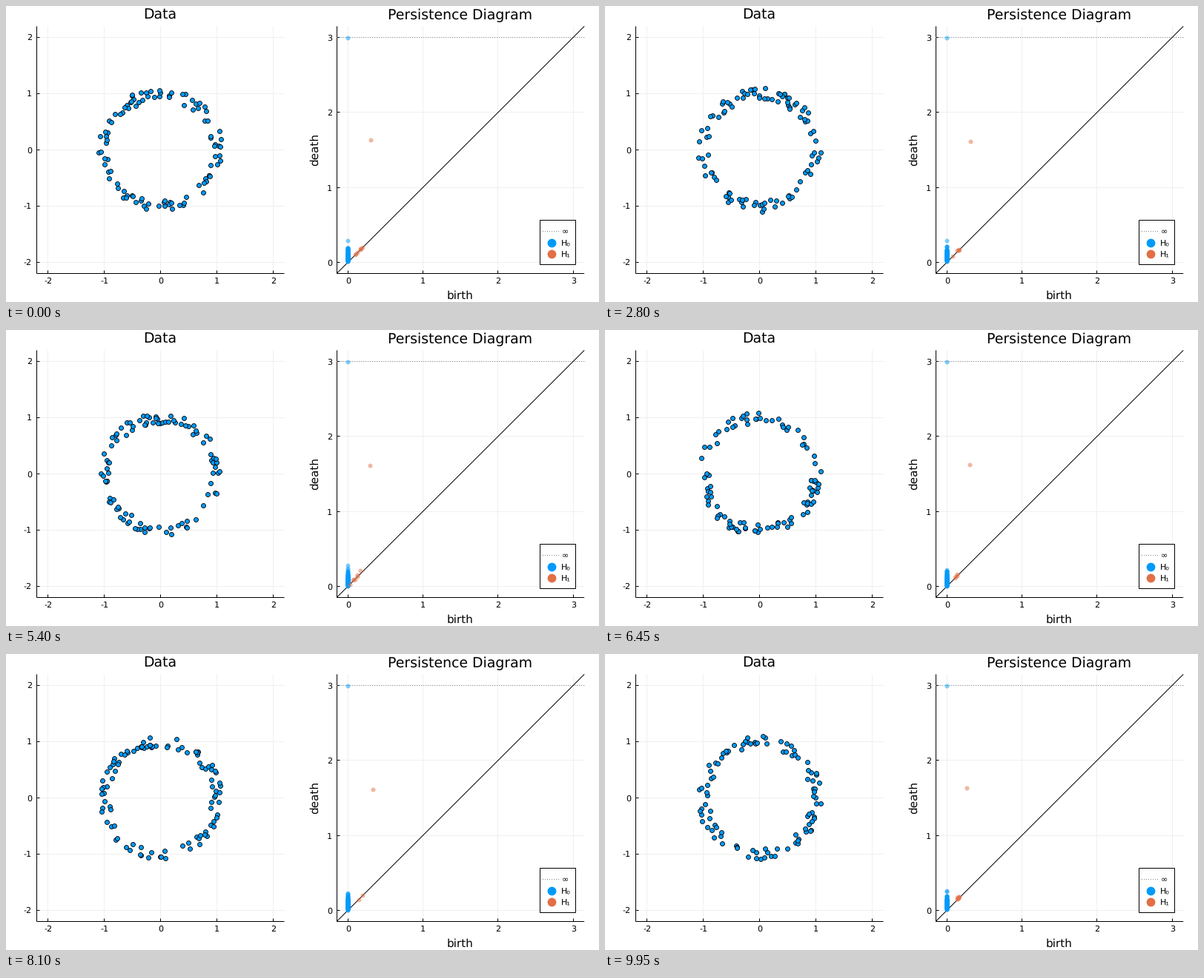
Write a matplotlib script that moves like this. It is 800 by 400 pixels and loops after 10000 ms.

```python
import math

import numpy as np
import matplotlib.pyplot as plt
from matplotlib.animation import FuncAnimation
from matplotlib.patches import Rectangle

W, H, DPI = 800, 400, 100
FRAMES, INTERVAL = 200, 50
N_POINTS, R_IN, R_OUT = 100, 0.9, 1.1
LOCAL_REACH = 0.3  # longest edge searched for short-lived loops
BLUE, ORANGE = "#009AFA", "#E26F46"

plt.rcParams.update({
    "font.family": "DejaVu Sans",
    "text.hinting": "none",
    "toolbar": "None",
})


def px(n):
    """Pixels to points."""
    return n * 72 / DPI


def crisp(v):
    """Centre of the pixel that holds v."""
    return math.floor(v) + 0.5


# ---------- data and persistent homology ----------

def annulus(rng):
    angle = rng.uniform(-np.pi, np.pi, N_POINTS)
    radius = np.sqrt(rng.uniform(R_IN**2, R_OUT**2, N_POINTS))
    return radius * np.cos(angle), radius * np.sin(angle)


def merge_edges(edges, angle):
    """Component merge edges and the first edge closing a loop round the centre."""
    comp = np.arange(len(angle))
    lift = angle.copy()
    merges, closing = [], None
    for k, (i, j) in enumerate(edges):
        step = (angle[j] - angle[i] + np.pi) % (2 * np.pi) - np.pi
        slip = lift[i] + step - lift[j]
        if comp[i] != comp[j]:
            members = comp == comp[j]
            lift[members] += slip
            comp[members] = comp[i]
            merges.append(k)
        elif closing is None and abs(slip) > np.pi:
            closing = k
        if closing is not None and len(merges) == len(angle) - 1:
            break
    return merges, closing


def fill_length(x, y, dist):
    """Shortest scale at which one triangle covers the centre."""
    ccw = np.outer(x, y) - np.outer(y, x) > 0
    reach = np.where(ccw, dist, np.inf)
    two_steps = np.maximum(reach[:, :, None], reach[None]).min(axis=1)
    return np.maximum(two_steps, reach.T).min()


def small_loops(edges, length, n):
    """Pairs (birth, death) from reducing the triangle boundary matrix."""
    rank = np.full((n, n), len(length))
    columns, pairs = {}, []
    count = np.searchsorted(length, LOCAL_REACH)
    for k, (i, j) in enumerate(edges[:count]):
        common = np.flatnonzero((rank[i] < k) & (rank[j] < k))
        for c in common:
            col = 1 << k | 1 << int(rank[i, c]) | 1 << int(rank[j, c])
            while col:
                pivot = col.bit_length() - 1
                if pivot not in columns:
                    columns[pivot] = col
                    if pivot != k:
                        pairs.append((length[pivot], length[k]))
                    break
                col ^= columns[pivot]
        rank[i, j] = rank[j, i] = k
    return pairs


def persistence(x, y):
    n = len(x)
    dist = np.hypot(x[:, None] - x, y[:, None] - y)
    a, b = np.triu_indices(n, 1)
    order = np.argsort(dist[a, b])
    length = dist[a, b][order]
    edges = list(zip(a[order].tolist(), b[order].tolist()))

    merges, closing = merge_edges(edges, np.arctan2(y, x))
    h0 = [(0, d) for d in length[merges]] + [(0, 3)]
    h1 = small_loops(edges, length, n)
    h1.append((length[closing], fill_length(x, y, dist)))
    return np.array(h0), np.array(h1)


# ---------- stage, in pixel coordinates ----------

fig = plt.figure(figsize=(W / DPI, H / DPI), dpi=DPI, facecolor="white")
ax = fig.add_axes([0, 0, 1, 1])
ax.set_xlim(0, W)
ax.set_ylim(H, 0)
ax.axis("off")


def line(xs, ys, color="black", width=1, **kw):
    kw.setdefault("solid_capstyle", "butt")
    ax.plot(xs, ys, color=color, lw=px(width), snap=False, **kw)


def label(x, y, text, size, ha="center", **kw):
    ax.text(x, y, text, fontsize=px(size), ha=ha, va="baseline", **kw)


class Panel:
    """Square plot area that maps data values to stage pixels."""
    top, bottom = 27.4, 361.4

    def __init__(self, left, low, high, ticks, title):
        self.left, self.low = left, low
        self.right = left + self.bottom - self.top
        self.scale = (self.bottom - self.top) / (high - low)
        edge, base = crisp(self.left), crisp(self.bottom)
        for t in ticks:
            x, y = crisp(self.x(t)), crisp(self.y(t))
            line([x, x], [self.top, base], "#EFEFEF")
            line([edge, self.right], [y, y], "#EFEFEF")
        for t in ticks:
            x, y = crisp(self.x(t)), crisp(self.y(t))
            line([x, x], [base, base - 4])
            line([edge, edge + 4], [y, y])
            label(x, 375.2, str(t), 11.1)
            label(edge - 6.6, y + 4, str(t), 11.1, ha="right")
        line([edge, edge, self.right], [self.top, base, base],
             solid_joinstyle="miter")
        label((self.left + self.right) / 2 - 0.4, 18, title, 18.9)

    def x(self, value):
        return self.left + (value - self.low) * self.scale

    def y(self, value):
        return self.bottom - (value - self.low) * self.scale


def dots(color, size, zorder, **kw):
    style = dict(mec="none", mew=0)
    style.update(kw)
    return ax.plot([], [], "o", color=color, ms=px(size), zorder=zorder, **style)[0]


def dotted(x0, x1, y, zorder):
    line([x0, x1], [y, y], "#808080", linestyle=(0, (1, 2)),
         dash_capstyle="butt", zorder=zorder)


data = Panel(41.5, -2.2, 2.2, range(-2, 3), "Data")
diagram = Panel(446.2, -0.15, 3.15, range(4), "Persistence Diagram")
label(613, 395.8, "birth", 15.3)
label(421, 193.8, "death", 15.3, rotation=90, rotation_mode="anchor")

dotted(diagram.left, diagram.right, crisp(diagram.y(3)), 3)
line([diagram.left, diagram.right], [diagram.bottom, diagram.top], zorder=3)

sample = dots(BLUE, 6, 4, mec="black", mew=px(0.85))
h0_dots = dots(BLUE, 6, 4, alpha=0.5)
h1_dots = dots(ORANGE, 6, 5, alpha=0.5)

ax.add_patch(Rectangle((720.5, 289.5), 48, 60, fc="white", ec="black",
                       lw=px(1), snap=False, zorder=6))
dotted(724, 747.5, 304.5, 7)
label(749.5, 308.3, "∞", 11.1, ha="left", zorder=7)
for row, color, name in ((319.7, BLUE, "H₀"), (334.8, ORANGE, "H₁")):
    dots(color, 11.8, 7).set_data([735.6], [row])
    label(749.2, row + 4.2, name, 11.1, ha="left", zorder=7)


def update(frame):
    x, y = annulus(np.random.default_rng(frame + 1))
    h0, h1 = persistence(x, y)
    sample.set_data(data.x(x), data.y(y))
    for artist, pairs in ((h0_dots, h0), (h1_dots, h1)):
        artist.set_data(diagram.x(pairs[:, 0]), diagram.y(pairs[:, 1]))
    return sample, h0_dots, h1_dots


anim = FuncAnimation(fig, update, frames=FRAMES, interval=INTERVAL,
                     repeat=True, repeat_delay=0, blit=False)
plt.show()
```
